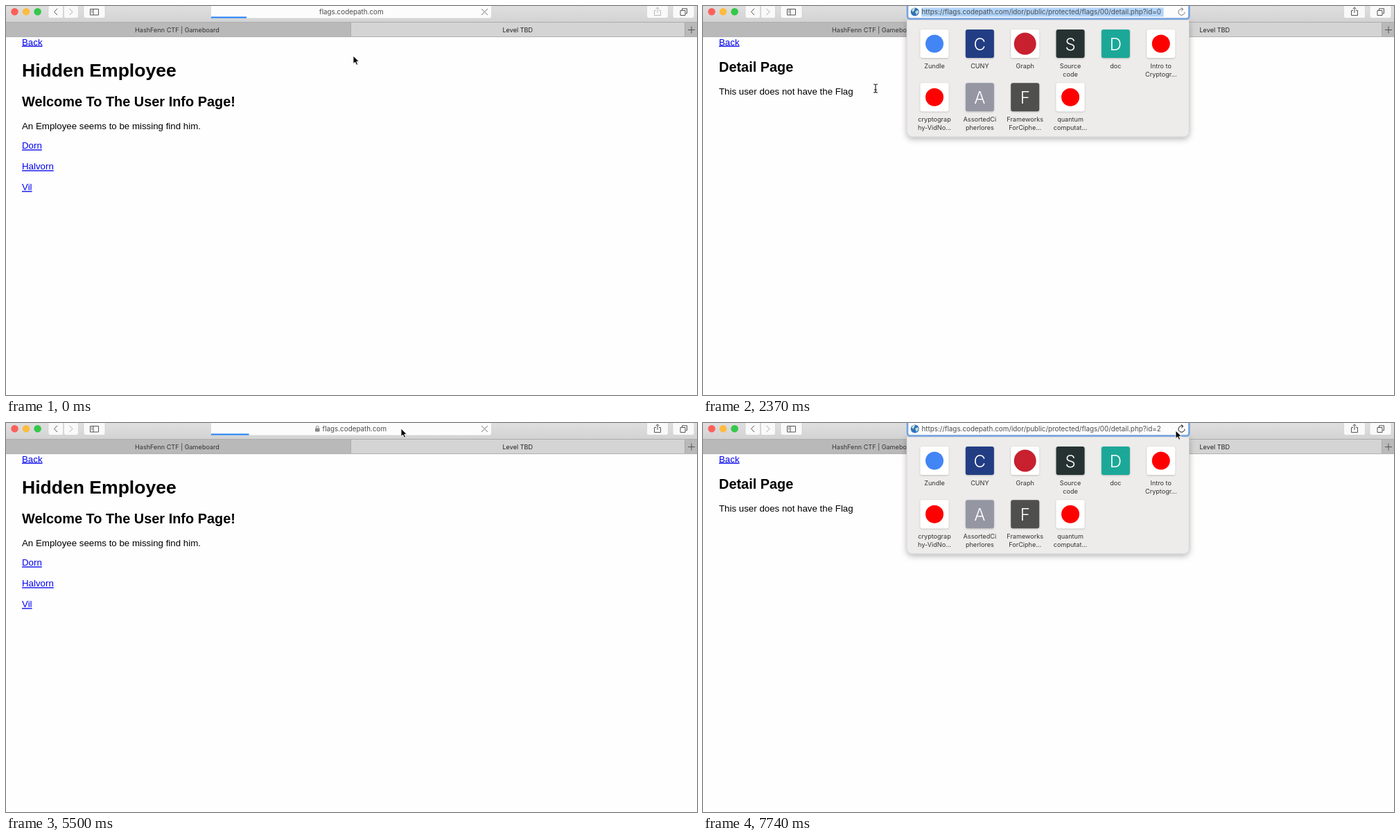
These frames come from a looping animation (997 by 562 pixels, 8 s). An HTML page:

```html
<!DOCTYPE html>
<html lang="en">
<head>
<meta charset="utf-8">
<title>Hidden Employee</title>
<style>
html, body { margin: 0; width: 100%; height: 100%; overflow: hidden; background: #fefefe; }
svg { display: block; width: 100%; height: 100%; }
text { white-space: pre; }
.page { font: 13.3px "Liberation Sans", Arial, sans-serif; fill: #000; }
.page .h1 { font-size: 26.56px; font-weight: bold; }
.page .h2 { font-size: 19.92px; font-weight: bold; }
.page .link { fill: #00e; text-decoration: underline; }
.ui { font-family: Inter, Roboto, sans-serif; font-size: 9.1px; fill: #333; }
.mid { text-anchor: middle; }
.address { font-size: 9.85px; fill: #4c4c4c; }
.letter { font-size: 24px; font-weight: 300; fill: #fff; }
.icon { fill: none; stroke: #555; stroke-width: 1; }
</style>
</head>
<body>
<svg viewBox="0 0 997 562">
  <defs>
    <linearGradient id="bar" x2="0" y2="1">
      <stop stop-color="#dfdfdf"/><stop offset="1" stop-color="#d2d2d2"/>
    </linearGradient>
    <filter id="shadow" x="-10%" y="-15%" width="120%" height="135%">
      <feDropShadow dx="0" dy="3" stdDeviation="4" flood-opacity=".28"/>
    </filter>
    <filter id="tileShadow" x="-20%" y="-20%" width="140%" height="150%">
      <feDropShadow dx="0" dy=".7" stdDeviation=".8" flood-opacity=".25"/>
    </filter>
  </defs>

  <rect width="997" height="562" fill="#fefefe"/>
  <g id="hidden" class="page">
    <text class="h1" x="23" y="102">Hidden Employee</text>
    <text class="h2" x="23" y="145">Welcome To The User Info Page!</text>
    <text x="23" y="178">An Employee seems to be missing find him.</text>
    <text class="link" x="23" y="206.3">Dorn</text>
    <text class="link" x="23" y="236.3">Halvorn</text>
    <text class="link" x="23" y="266.3">Vil</text>
  </g>
  <g id="detail" class="page">
    <text class="h2" x="23" y="95">Detail Page</text>
    <text x="23" y="128.3">This user does not have the Flag</text>
  </g>
  <text class="page"><tspan class="link" x="23" y="56.5">Back</tspan></text>

  <g class="ui">
    <rect width="997" height="24" fill="url(#bar)"/>
    <rect y="23.3" width="997" height="21.2" fill="#b9b9b9"/>
    <rect x="498" y="24" width="481" height="20" fill="#d4d4d4"/>
    <path d="M0 23.5H997M0 44.5H997M497.5 24V44M979.5 24V44" stroke="#a8a8a8" stroke-width=".8"/>
    <path d="M984 34.5h10M989 29.5v10" class="icon"/>
    <text class="mid" x="247" y="37.6">HashFenn CTF | Gameboard</text>
    <text class="mid" x="738.3" y="37.6" fill="#222">Level TBD</text>
    <circle cx="12.5" cy="8.3" r="5.3" fill="#fc605b"/>
    <circle cx="29" cy="8.3" r="5.3" fill="#fdbc40"/>
    <circle cx="45.6" cy="8.3" r="5.3" fill="#34c84a"/>
    <g id="buttons"></g>
    <path class="icon" stroke-width="1.3" d="M74 3.8L69.5 8.4L74 13"/>
    <path class="icon" style="stroke:#aaa" d="M91.5 3.8L96 8.4L91.5 13"/>
    <path class="icon" d="M121.5 4.5h12v8.5h-12zM126 4.5v8.5M123 6.8h1.6M123 8.8h1.6"/>
    <path id="share" class="icon" d="M938 6.5h-2.5v7h9v-7H942M940 10V2M937.5 4.3L940 1.8L942.5 4.3"/>
    <path class="icon" d="M973 6.5h7v7h-7zM975.5 6V3.8h7v7h-2"/>
  </g>

  <g id="popover">
    <path d="M294 20H701.500V181a8 8 0 0 1-8 8H302a8 8 0 0 1-8-8Z" fill="#edeceb" stroke="#c6c5c4" stroke-width=".6" filter="url(#shadow)"/>
    <g id="tiles" class="ui mid"></g>
  </g>

  <rect id="halo" x="293" y="-6" width="410.500" height="26" rx="5" fill="none" stroke="#a9c4ec" stroke-width="6"/>
  <rect x="296" y="-6" width="404" height="23.500" rx="3" fill="#fcfcfc"/>
  <rect id="ring" x="295" y="-6" width="406.500" height="24.500" rx="4" fill="none" stroke="#74a3e2" stroke-width="2.6"/>
  <g id="focused" class="ui">
    <circle cx="305.7" cy="8.500" r="6" fill="#2f73bd"/>
    <path d="M301 6q2-4 5-3l-1 3l-2 3zM306 8l4-2l1 3l-3 4z" fill="#c5dcd0"/>
    <rect id="selection" y="2.500" width="349.500" height="13" fill="#b0d4fb"/>
    <text id="url" class="address" y="12.3"></text>
    <path id="caret" d="M665 3v12" stroke="#222" stroke-width=".8"/>
  </g>
  <g id="blurred" class="ui">
    <g id="lock">
      <rect x="446" y="7.500" width="6.600" height="5" rx=".8" fill="#888"/>
      <path d="M447.500 7.500V6a1.800 1.800 0 0 1 3.600 0v1.500" fill="none" stroke="#888"/>
    </g>
    <text id="host" class="address" y="12.3">flags.codepath.com</text>
  </g>
  <rect id="progress" x="296" y="15.500" height="2" fill="#1a7cf5"/>
  <path id="stop" class="icon" d="M686 4l9 9M695 4l-9 9" style="stroke:#777"/>
  <path id="reload" class="icon" d="M692.500 4.700A4.500 4.500 0 1 0 695 8.700M690 2.300L692.800 4.800L690.200 7.200"/>

  <g id="cursor">
    <path id="arrow" d="M0 0V11.500L2.700 9L4.600 13.300L6.600 12.400L4.800 8.200H8.400Z" stroke="#fff" stroke-width=".9"/>
    <g id="beam" fill="none" stroke-linecap="round">
      <path d="M-2.500-6Q0-6 0-4.500V4.500Q0 6-2.500 6M2.500-6Q0-6 0-4.500M0 4.500Q0 6 2.500 6M-1.500 2h3" stroke="#fff" stroke-width="2"/>
      <path d="M-2.500-6Q0-6 0-4.500V4.500Q0 6-2.500 6M2.500-6Q0-6 0-4.500M0 4.500Q0 6 2.500 6M-1.500 2h3" stroke="#111" stroke-width="1.100"/>
    </g>
    <path id="hand" d="M-1 1q1-2 2 0v4l5 1.500q1.500.5 1 3L6 13H0L-3.500 8.500q0-1.500 2.500 0Z" fill="#fff" stroke="#111" stroke-width=".9"/>
  </g>
</svg>
<script>
const LOOP = 8000, STEP = 148.6, LAST_STEP = 52;
const $ = id => document.getElementById(id);
const show = (id, visible) => { $(id).style.display = visible ? '' : 'none'; };
const within = (k, from, to) => k >= from && k < to;

$('buttons').innerHTML = [[61, 21.5], [83.5, 21], [112, 31], [924.5, 31], [962, 31]]
  .map(([x, w]) => `<rect x="${x}" y="-6" width="${w}" height="23.5" rx="3" fill="#f9f9f9" stroke="#c3c3c3" stroke-width=".5"/>`)
  .join('');

// Each favourite: tile colour, letter or dot, label lines.
const dot = (color, r) => ({ color, r });
const favourites = [
  ['#fff', dot('#4285f4', 13), 'Zundle'],
  ['#233e83', 'C', 'CUNY'],
  ['#fff', dot('#c8202f', 16), 'Graph'],
  ['#273133', 'S', 'Source', 'code'],
  ['#1da898', 'D', 'doc'],
  ['#fff', dot('#f00', 13), 'Intro to', 'Cryptogr...'],
  ['#fff', dot('#f00', 13), 'cryptograp', 'hy-VidNo...'],
  ['#9496a2', 'A', 'AssortedCi', 'pherlores'],
  ['#504f4e', 'F', 'Frameworks', 'ForCiphe...'],
  ['#fff', dot('#f00', 13), 'quantum', 'computat...']
];
$('tiles').innerHTML = favourites.map(([fill, mark, ...lines], i) => {
  const x = 334 + (i % 6) * 65.35, y = i < 6 ? 54.5 : 131.7;
  const symbol = mark.r
    ? `<circle cx="${x}" cy="${y}" r="${mark.r}" fill="${mark.color}"/>`
    : `<text class="letter" x="${x}" y="${y + 9}">${mark}</text>`;
  const label = lines.map((line, n) => `<text x="${x}" y="${y + 35.3 + n * 12}">${line}</text>`).join('');
  return `<rect x="${x - 20.5}" y="${y - 20.5}" width="41" height="41" rx="3" fill="${fill}" filter="url(#tileShadow)"/>${symbol}${label}`;
}).join('');

// Pointer path: step, x, y, shape from that step on.
const path = [
  [0, 501, 72, 'arrow'], [2, 556, 34, 'arrow'], [4, 600, 14, 'beam'], [6, 605, 14, 'beam'],
  [10, 605, 14, 'beam'], [11, 560, 34, 'arrow'], [14, 285, 112, 'beam'], [16, 213, 126, 'beam'],
  [18, 213, 126, 'beam'], [19, 150, 95, 'arrow'], [21, 45, 52, 'hand'], [23, 45, 52, 'hand'],
  [24, 48, 70, 'arrow'], [27, 57, 250, 'arrow'], [29, 31, 263, 'hand'], [31, 31, 263, 'hand'],
  [32, 70, 235, 'arrow'], [35, 430, 70, 'arrow'], [37, 570, 8, 'arrow'], [39, 645, 12, 'beam'],
  [41, 670, 12, 'beam'], [47, 668, 12, 'beam'], [49, 666, 12, 'beam'], [50, 673, 12, 'arrow'],
  [52, 682, 11, 'arrow']
];
function pointerAt(k) {
  const i = path.findLastIndex(p => p[0] <= k);
  const a = path[i], b = path[i + 1] || a;
  const f = b === a ? 0 : (k - a[0]) / (b[0] - a[0]);
  return { x: a[1] + (b[1] - a[1]) * f, y: a[2] + (b[2] - a[2]) * f, shape: a[3] };
}

// Page loads: click, first response, new content, finished.
const loads = [[0, 2, 3, 4], [23, 25, 25, 28], [30, 33, 39, 40]];
function progressAt(k, [click, response, content]) {
  if (k < response) return 51;
  return content > response && k >= content ? 300 : 54.5;
}

function draw(k) {
  const load = loads.find(l => within(k, l[0], l[3]));
  const waiting = !!load && k < load[1];
  const onDetail = within(k, 3, 25) || k >= 39;
  const open = within(k, 7, 18) || k >= 44;
  const selected = open && k < 48 && k !== 17;

  show('hidden', !onDetail);
  show('detail', onDetail);
  $('share').style.stroke = waiting ? '#bbb' : '#555';

  show('popover', open);
  $('popover').style.opacity = { 7: .6, 8: .95, 17: .5 }[k] ?? 1;
  show('halo', [7, 17, 44].includes(k));
  show('ring', open);
  show('focused', open);
  show('blurred', !open);
  const urlX = 315.4 + ({ 7: 20, 8: 3, 44: .6 }[k] || 0);
  $('url').textContent = `https://flags.codepath.com/idor/public/protected/flags/00/detail.php?id=${k < 31 ? 0 : 2}`;
  $('url').setAttribute('x', urlX);
  $('selection').setAttribute('x', urlX - .3);
  show('selection', selected);
  show('caret', within(k, 48, 51));

  show('lock', !waiting);
  $('host').setAttribute('x', waiting ? 452 : 456.5);
  show('progress', load);
  if (load) $('progress').setAttribute('width', progressAt(k, load));
  show('stop', load);
  show('reload', !load);
  $('reload').style.stroke = k >= 51 ? '#111' : '#777';

  const pointer = pointerAt(k);
  $('cursor').setAttribute('transform', `translate(${pointer.x} ${pointer.y})`);
  for (const shape of ['arrow', 'beam', 'hand']) show(shape, shape === pointer.shape);
}

const start = performance.now();
function tick() {
  const time = (performance.now() - start) % LOOP;
  draw(Math.min(LAST_STEP, Math.floor((time + 5) / STEP)));
  requestAnimationFrame(tick);
}
tick();
</script>
</body>
</html>
```
